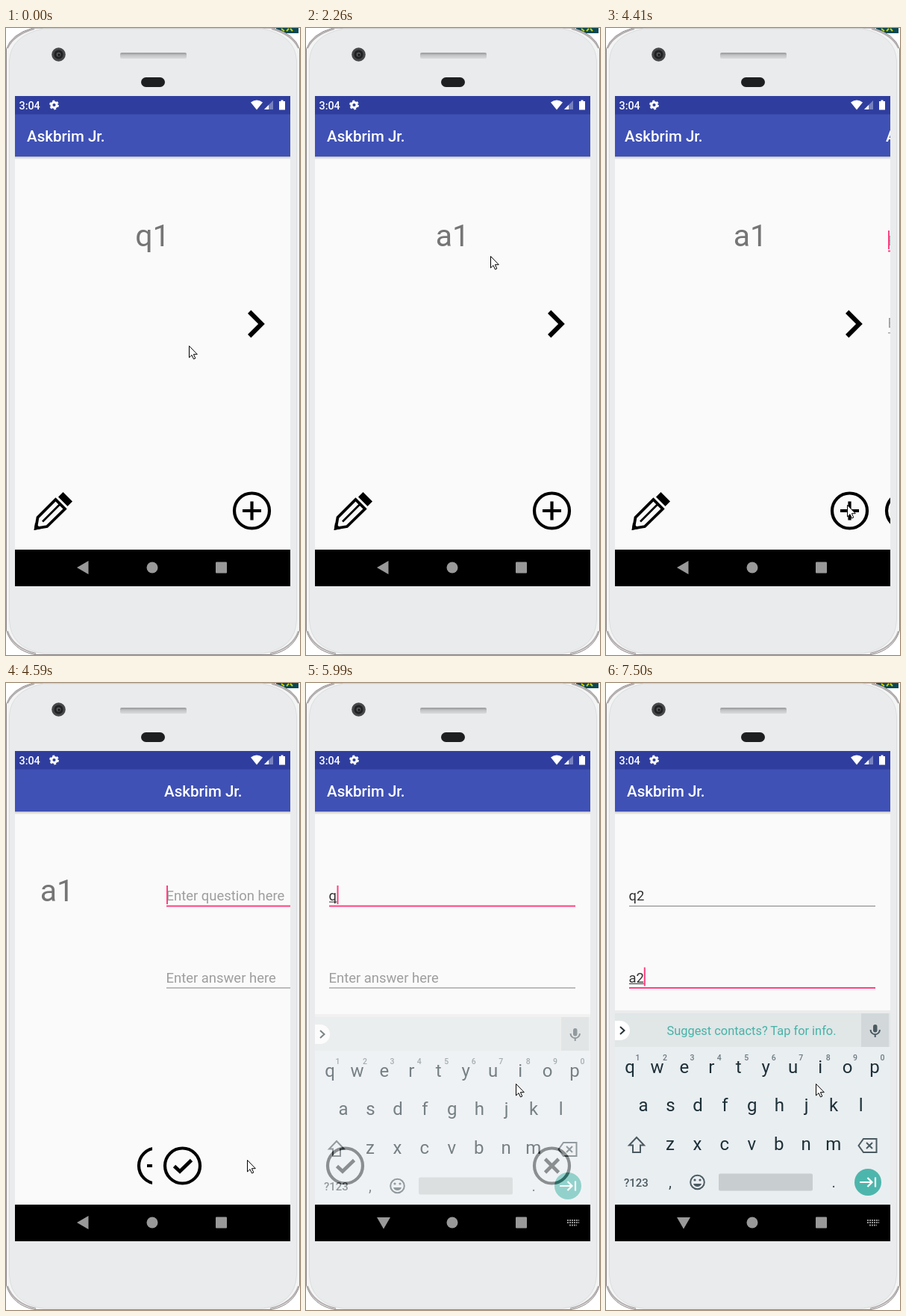
Recreate the animation shown at these times as an HTML page. Size 394 by 839 pixels, loop 8000 ms.

```html
<!DOCTYPE html>
<html lang="en">
<head>
<meta charset="utf-8">
<title>Flash cards</title>
<style>
html, body { margin: 0; width: 100%; height: 100%; overflow: hidden; background: #fff; }
svg { display: block; width: 394px; height: 839px; }
text { font-family: Roboto, "Open Sans", sans-serif; white-space: pre; }
.title { font-size: 20.5px; font-weight: 500; fill: #fff; }
.field { font-size: 18.45px; }
.line { fill: none; stroke: #000; }
.mid { text-anchor: middle; }
.icon { fill: none; stroke: #4b5a61; stroke-width: 2; }
</style>
</head>
<body>
<svg viewBox="0 0 394 839">
  <defs>
    <clipPath id="screenClip"><rect x="12" y="91" width="369" height="607"/></clipPath>
    <clipPath id="cardClip"><rect x="12" y="172" width="369" height="205"/></clipPath>
    <linearGradient id="shade" x2="0" y2="1">
      <stop stop-opacity=".22"/><stop offset="1" stop-opacity="0"/>
    </linearGradient>
    <linearGradient id="speaker" x2="0" y2="1">
      <stop stop-color="#939597"/><stop offset=".45" stop-color="#c3c5c6"/><stop offset="1" stop-color="#d9dbdc"/>
    </linearGradient>
    <g id="page">
      <rect x="12" y="91" width="369" height="607" fill="#fafafa"/>
      <rect x="12" y="172" width="369" height="4" fill="url(#shade)"/>
      <rect x="12" y="91" width="369" height="25" fill="#2f3e9e"/>
      <rect x="12" y="115.500" width="369" height="56.500" fill="#3f51b5"/>
      <text class="title" x="28" y="152">Askbrim Jr.</text>
    </g>
    <circle id="ring" r="23.500" class="line" stroke-width="4.200"/>
  </defs>

  <rect width="394" height="839" fill="#fff"/>
  <rect x="362" width="30" height="7" fill="#0b4854"/>
  <path d="M369 1l4 3M376 4l3-3M381 1l3 3" stroke="#c8d400" stroke-width="2"/>
  <path d="M.5 28Q7 8 36 0H358Q387 8 393.500 28V806Q386 832 356 838.500H38Q8 832 .5 806Z" fill="#f3f4f4" stroke="#8f898a"/>
  <path d="M4.500 44Q6 10 50 1H344Q388 10 389.500 44V792Q388 830 344 837H50Q6 830 4.500 792Z" fill="#e9ebec" stroke="#dcdddf"/>
  <path d="M2 27Q10 9 38 1M392 27Q384 9 356 1M2 807Q10 830 40 837M392 807Q384 830 354 837" fill="none" stroke="#b3adae" stroke-width="2"/>
  <circle cx="70.500" cy="35.500" r="9.300" fill="#464749"/>
  <circle cx="70.500" cy="35.500" r="6" fill="#202123"/>
  <circle cx="70.500" cy="35.500" r="3" fill="#525456"/>
  <circle cx="71" cy="36" r="1.500" fill="#111"/>
  <rect x="153" y="33" width="89" height="8" rx="2" fill="url(#speaker)"/>
  <rect x="181" y="66" width="32" height="13" rx="6.500" fill="#1e1f21"/>

  <g clip-path="url(#screenClip)">
    <g id="cards">
      <use href="#page"/>
      <circle id="ripple" cx="202.500" cy="280" r="147" clip-path="url(#cardClip)"/>
      <text id="card" class="mid" x="196.500" y="292" font-size="41" fill="#757575"></text>
      <path transform="translate(297.600 359.100) scale(3.075)" d="M10 6 8.590 7.410 13.170 12 8.590 16.590 10 18 16 12z"/>
      <path class="line" stroke-width="3.800" d="M40 669.500 42.500 655 66.500 631 79 643.500 55 667Z"/>
      <path class="line" stroke-width="2.600" d="M49 660.500 72 637.500"/>
      <path d="M76.500 621 89 633.500 82.500 640 70 627.500ZM37.500 672 39 662 47 670Z"/>
      <use href="#ring" x="329.500" y="646"/>
      <path class="line" stroke-width="4.200" d="M317 646H342M329.500 633.500V658.500"/>
    </g>
    <g id="form">
      <use href="#page"/>
      <g id="fields"></g>
      <use href="#ring" x="52.500" y="646"/>
      <path class="line" stroke-width="4.800" d="M41.500 646.500 49 653.500 64.500 638.500"/>
      <use href="#ring" x="329.500" y="646"/>
      <path class="line" stroke-width="4.600" d="M320.500 637 338.500 655M338.500 637 320.500 655"/>
    </g>
    <g id="keyboard">
      <rect x="12" y="438" width="369" height="4" fill="#000" opacity=".06"/>
      <rect x="12" y="442" width="369" height="256" fill="#e9eef1"/>
      <rect x="12" y="442" width="369" height="45" fill="#e1e6e7"/>
      <rect x="342" y="442" width="37" height="45" fill="#d2d8da"/>
      <path d="M12 452H19a13 13 0 0 1 0 26H12Z" fill="#fff"/>
      <path d="M19 460 24.500 465 19 470" class="icon" stroke="#222" style="stroke:#263238"/>
      <rect x="358" y="457" width="5.500" height="10.500" rx="2.700" fill="#4b5a61"/>
      <path d="M354.500 464a6.200 6.200 0 0 0 12.400 0M360.700 470V474" class="icon" stroke-width="1.600"/>
      <g id="words" class="field mid" fill="#5d6b71">
        <text class="mid" x="96" y="472">q2</text><text class="mid" x="194.500" y="472">Q2</text><text class="mid" x="293.500" y="472">W-2</text>
        <path d="M143 453V478M247.500 453V478" stroke="#cdd2d4"/>
      </g>
      <text id="tip" class="mid" x="195" y="471" font-size="16.400" fill="#45b3a7">Suggest contacts? Tap for info.</text>
      <g id="keys"></g>
      <path class="icon" d="M41 608 51 618.500H46V628H36V618.500H31Z"/>
      <path class="icon" d="M338.500 619 345 610H362.500V628H345ZM349 615l8 8M357 615l-8 8"/>
      <text x="24" y="674" font-size="15" font-weight="500" fill="#4b5a61">?123</text>
      <text x="84" y="675" font-size="20" fill="#37474f">,</text>
      <text x="302.500" y="675" font-size="20" fill="#37474f">.</text>
      <circle class="icon" cx="122.500" cy="668" r="9.300"/>
      <path d="M117 670a5.800 5.800 0 0 0 11 0Z" fill="#4b5a61"/>
      <circle cx="119" cy="665" r="1.600" fill="#4b5a61"/><circle cx="126" cy="665" r="1.600" fill="#4b5a61"/>
      <rect x="151" y="656.500" width="126" height="23" rx="2" fill="#c8cdd0"/>
      <circle cx="351" cy="668" r="18" fill="#4db6ac"/>
      <path d="M340 668H356M350.500 662 356.500 668 350.500 674M361 661.500V674.500" fill="none" stroke="#fff" stroke-width="2.200"/>
    </g>
  </g>

  <g fill="#fff">
    <text x="17.500" y="108.500" font-size="14.350" font-weight="500">3:04</text>
    <circle cx="64.500" cy="103" r="3.600" fill="none" stroke="#fff" stroke-width="3"/>
    <circle cx="64.500" cy="103" r="5.400" fill="none" stroke="#fff" stroke-width="2" stroke-dasharray="2.830"/>
    <path d="M328 99.500Q336 93.500 344 99.500L336 109.500Z"/>
    <path d="M358 97V109H346Z" opacity=".35"/><path d="M352 103V109H346Z"/>
    <path d="M366 98H368.500V96.500H371.500V98H374V109.500H366Z"/>
  </g>
  <rect x="12" y="698" width="369" height="49" fill="#000"/>
  <g fill="#999">
    <path id="back"/>
    <circle cx="196" cy="722" r="7.500"/>
    <rect x="281" y="714.500" width="15" height="15" rx="1"/>
    <path id="imeIcon" d="M350 719H366M350 722H366M353 725.500H363" stroke="#999" stroke-width="2" stroke-dasharray="2 1"/>
  </g>
  <path id="pointer" d="M.5.5V16L4 12.700 6.500 18 8.800 17 6.400 11.700H11.300Z" fill="#fff" stroke="#000"/>
</svg>
<script>
const LOOP = 8000, WIDTH = 369, PINK = "#ff4081";
const $ = id => document.getElementById(id);
const clamp = x => Math.max(0, Math.min(1, x));
const show = (el, on) => el.style.display = on ? "" : "none";
const smooth = x => (1 - Math.cos(Math.PI * clamp(x))) / 2;

function addKeys(letters, left, baseline, hints = "") {
  [...letters].forEach((letter, i) => {
    const x = left + i * 36.45;
    $("keys").innerHTML += `<text class="mid" x="${x}" y="${baseline}" font-size="24" fill="#1d2f37">${letter}</text>` +
      (hints ? `<text class="mid" x="${x + 10.5}" y="505" font-size="10.5" font-weight="500" fill="#6b7a81">${hints[i]}</text>` : "");
  });
}
addKeys("qwertyuiop", 32, 522, "1234567890");
addKeys("asdfghjkl", 50, 573);
addKeys("zxcvbnm", 86, 625);

function makeField(hint, baseline) {
  const g = document.createElementNS("http://www.w3.org/2000/svg", "g");
  g.innerHTML = `<text class="field" x="30.5" y="${baseline}"></text><rect x="31" y="${baseline + 1.5}" height="1" fill="#333"/>
    <rect x="31" width="330"/><rect y="${baseline - 20}" width="2" height="25" fill="${PINK}"/>`;
  $("fields").append(g);
  const [label, composing, rule, caret] = g.children;
  return (value, width, focused, caretOn) => {
    label.textContent = value || hint;
    label.setAttribute("fill", value ? "#333" : "#9e9e9e");
    composing.setAttribute("width", focused ? width : 0);
    rule.setAttribute("y", baseline + (focused ? 6.5 : 7));
    rule.setAttribute("height", focused ? 2 : 1);
    rule.setAttribute("fill", focused ? PINK : "#808080");
    caret.setAttribute("x", 31 + width);
    show(caret, focused && caretOn);
  };
}
const question = makeField("Enter question here", 291);
const answer = makeField("Enter answer here", 400.5);

// Screen updates arrive in bursts: [first, last, count]
const bursts = [[460, 820, 5], [1160, 1530, 5], [2260, 2990, 10], [3070, 3850, 10],
  [4410, 5100, 9], [5290, 5290, 1], [5810, 6150, 5], [6560, 6560, 1], [6730, 6800, 2], [7140, 7140, 1], [7500, 7500, 1]];
function snap(t) {
  let at = 0;
  for (const [first, last, count] of bursts) {
    if (t < first) break;
    const gap = (last - first) / (count - 1) || 1;
    at = first + Math.min(count - 1, Math.floor((t - first) / gap + 1e-6)) * gap;
  }
  return at;
}

// Pointer moves: [start, end, from, to, sideways bow]
const moves = [[370, 820, [245, 425], [206, 284], 0], [2259, 2260, [206, 284], [247, 305], 0],
  [2260, 2990, [247, 305], [322, 380], 0], [2985, 3850, [322, 380], [323, 638], 18],
  [4750, 5100, [323, 638], [281, 536], 0]];
function pointerAt(t) {
  let pos = [245, 425];
  for (const [start, end, from, to, bow] of moves) {
    if (t < start || t < 460) break;
    const p = smooth((t - start) / (end - start));
    pos = from.map((v, i) => v + (to[i] - v) * p);
    pos[0] += bow * Math.sin(Math.PI * p);
  }
  return pos;
}

function render(now) {
  const t = snap(now);
  $("pointer").setAttribute("transform", `translate(${pointerAt(t).map(Math.round)})`);

  $("card").textContent = t < 1250 ? "q1" : "a1";
  $("ripple").setAttribute("opacity", t < 1160 ? 0 : 0.112 * clamp((1530 - t) / 370));

  const sliding = t >= 4410;
  const leave = sliding ? smooth((t - 4382) / 500) : 0;
  const enter = sliding ? smooth((t - 4332) / 500) : 0;
  $("cards").setAttribute("transform", `translate(${Math.round(-WIDTH * leave)})`);
  $("form").setAttribute("transform", `translate(${Math.round(WIDTH * (1 - enter))})`);
  show($("cards"), leave < 1);
  show($("form"), sliding);

  const onAnswer = t >= 6730;
  const asked = t < 5810 ? "" : t < 6075 ? "q" : "q2";
  const answered = t < 7140 ? "" : t < 7500 ? "a" : "a2";
  const caretOn = t < 4840 || (t >= 5290 && t < 6560);
  question(asked, [0, 10.5, 20.8][asked.length], !onAnswer, caretOn);
  answer(answered, [0, 10, 19.8][answered.length], onAnswer, true);

  const rise = clamp((t - 5810) / 285);
  const typing = t > 5810;
  show($("keyboard"), typing);
  $("keyboard").setAttribute("opacity", t >= 6149 ? 1 : rise);
  $("keyboard").setAttribute("transform", `translate(0 ${Math.round(40 * (1 - clamp(rise * 1.06)) ** 2)})`);
  show($("words"), t >= 6075 && t < 6800);
  show($("tip"), t >= 6800);
  show($("imeIcon"), typing);
  $("back").setAttribute("d", typing ? "M95 715H113L104 730.5Z" : "M95 722 110.500 713V731Z");
}

const began = performance.now();
function frame() {
  render((performance.now() - began) % LOOP);
  requestAnimationFrame(frame);
}
frame();
</script>
</body>
</html>
```
